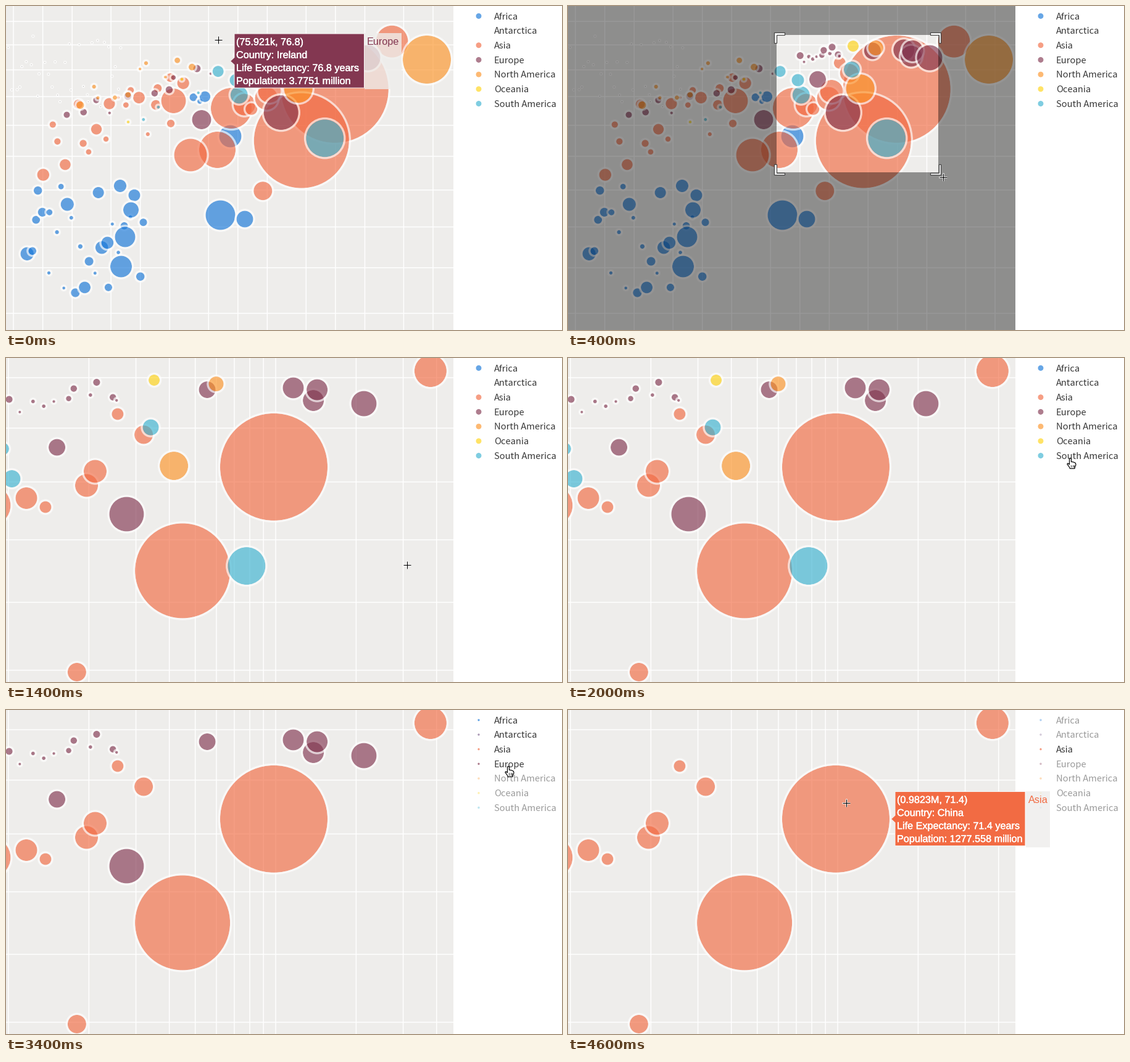
Write a matplotlib script that moves like this. It is 901x526 px and loops after 4800 ms.

```python
import numpy as np
import matplotlib.pyplot as plt
from matplotlib import patheffects
from matplotlib.animation import FuncAnimation
from matplotlib.collections import EllipseCollection
from matplotlib.patches import Polygon, Rectangle

W, H, DPI = 901, 526, 64
PT = 72 / DPI  # points per pixel
PLOT_W = 725
STEPS = 24
BG = "#eeedeb"
ALPHA = 0.65
RING = 3.3

# close-up view: screen = (wide - ORIGIN) * SCALE
ORIGIN = np.array([374.35, 47.25])
SCALE = np.array([2.739, 2.016])

COLORS = {
    "Africa": (22, 119, 218), "Antarctica": (125, 95, 140),
    "Asia": (242, 107, 67), "Europe": (131, 55, 81),
    "North America": (252, 148, 40), "Oceania": (255, 212, 20),
    "South America": (58, 179, 209),
}
NAMES = list(COLORS)

# the large countries: x, y, radius in the wide view
MAJOR = {
    "Africa": [(347.5, 339.5, 24), (363.5, 211.5, 18), (193, 375, 16.5),
               (186.5, 423, 17.5), (202.5, 331, 12.5), (387, 346, 13.5)],
    "Asia": [(532.8, 135, 87), (478.8, 218.6, 77), (365, 166, 33),
             (342.5, 233.5, 29.5), (299, 242, 26.5), (271.5, 154, 20),
             (386.4, 160.1, 17.5), (397.7, 167.3, 9.5), (422, 149.9, 18.5),
             (427.1, 138.5, 18.5), (440.4, 92.4, 9.5), (455.8, 109, 15),
             (416.3, 300.2, 15), (625.5, 57.7, 26)],
    "Europe": [(317, 184.5, 15.5), (404.5, 119.2, 13.5), (493.4, 72.8, 13.5),
               (544.3, 71.3, 17), (556.2, 81.5, 17), (558.4, 72.8, 17),
               (586.1, 84, 20.5), (445.7, 173, 28)],
    "North America": [(682, 87, 39), (498.7, 68.1, 12), (473.7, 134.1, 23)],
    "Oceania": [(462, 65.1, 9)],
    "South America": [(460, 103.1, 13), (516.7, 214.7, 30.5),
                      (377.8, 144.5, 14), (372.5, 120.4, 10)],
}

# the rest scatter about a trend line:
# group, count, x from, x to, y from, y to, scatter, largest radius
CLOUDS = [
    ("Africa", 29, 30, 225, 400, 375, 100, 11),
    ("Africa", 3, 300, 330, 155, 145, 6, 12),
    ("Asia", 20, 60, 290, 240, 130, 55, 10),
    ("Europe", 10, 90, 345, 175, 110, 20, 6.5),
    ("Europe", 11, 376, 446, 84, 72, 9, 6.5),
    ("North America", 10, 105, 305, 150, 95, 25, 6.5),
    ("Oceania", 2, 165, 340, 213, 80, 5, 4),
    ("South America", 4, 205, 360, 200, 105, 12, 10),
]


def scatter(rng, n, x0, x1, y0, y1, spread, r_max):
    t = (np.arange(n) + rng.random(n)) / n
    y = y0 + (y1 - y0) * t + spread * rng.uniform(-1, 1, n)
    r = 2 + (r_max - 2) * rng.random(n) ** 1.4
    return np.column_stack([x0 + (x1 - x0) * t, y, r])


def build():
    rng = np.random.default_rng(7)
    data = {name: np.array(rows, float) for name, rows in MAJOR.items()}
    for name, *cloud in CLOUDS:
        data[name] = np.vstack([scatter(rng, *cloud), data[name]])
    return data, scatter(rng, 34, 2, 195, 105, 105, 60, 2)[:, :2]


DATA, SPECKS = build()

# step after which each group starts to vanish, and how many steps it takes
HIDE = {"South America": (11, 1), "Oceania": (12, 1), "North America": (14, 2),
        "Europe": (17, 1), "Antarctica": (19, 1), "Africa": (21, 1)}

DRAG_END, ZOOM, LEGEND_HOVER, SHRINK = 6, 7, 10, 12
BOX_START, BOX_SIZE = np.array([338, 47]), np.array([302, 290])

HAND = [(-1.5, 1), (0, 0), (1.5, 1), (1.5, 6), (4, 6.2), (6.5, 7), (8.5, 8.2),
        (9, 11), (7.6, 14), (7, 17), (-.5, 17), (-2, 14), (-5, 10),
        (-4.5, 8.5), (-3, 9), (-1.5, 10.5)]
ARROW = [(0, 0), (0, 14), (3, 11), (5.5, 16.5), (7.6, 15.6), (5.2, 10.4),
         (9.8, 10)]
BRACKET = [(-4, 13), (-.5, 13), (-.5, -.5), (13, -.5), (13, -4), (-4, -4)]

fig = plt.figure(figsize=(W / DPI, H / DPI), dpi=DPI, facecolor="white")
ax = fig.add_axes([0, 0, 1, 1])


def rgb(name):
    return tuple(c / 255 for c in COLORS[name])


def rect(x, y, w, h, color, alpha=1, z=1):
    ax.add_patch(Rectangle((x, y), w, h, fc=color, ec="none",
                           alpha=alpha, zorder=z))


def shape(points, at, fill, edge, width=1, z=8):
    ax.add_patch(Polygon(np.array(points) + at, fc=fill, ec=edge,
                         lw=width * PT, zorder=z))


def label(x, y, text, color, size, font, alpha=1, z=6, weight=0):
    t = ax.text(x, y, text, color=color, fontsize=size * PT, family=font,
                alpha=alpha, va="baseline", zorder=z)
    if weight:
        t.set_path_effects([patheffects.withStroke(
            linewidth=weight * PT, foreground=color)])


def discs(xy, r, color, alpha, ring=RING, z=3):
    """Each disc is a fill followed by its own ring."""
    n = len(r)
    d = 2 * np.column_stack([r, r + ring / 2]).ravel()
    ax.add_collection(EllipseCollection(
        d, d, np.zeros(2 * n), units="xy", offsets=np.repeat(xy, 2, axis=0),
        offset_transform=ax.transData,
        facecolors=[(*color, alpha), (0, 0, 0, 0)] * n,
        edgecolors=[(0, 0, 0, 0), (1, 1, 1, alpha)] * n,
        linewidths=[0, ring * PT] * n, zorder=z))


def shown(name, i):
    start, steps = HIDE.get(name, (STEPS, 1))
    return float(np.clip(1 - (i - start) / steps, 0, 1))


def row_y(k):
    return 16.3 + 23.7 * k


def grid(zoomed):
    digits = range(1, 10) if zoomed else (1, 2, 5)
    gdp = np.array([d * 10.0 ** e for e in range(2, 8) for d in digits])
    age = np.arange(40, 90, 5)
    gx = 533.9 + 158.1 * np.log10(gdp / 1e6)
    gy = 63.1 + 628.8 * np.log(80 / age)
    if zoomed:
        gx = (gx - ORIGIN[0]) * SCALE[0]
        gy = (gy - ORIGIN[1]) * SCALE[1]
    gx = gx[(gx > 0) & (gx < PLOT_W)]
    style = dict(colors="white", lw=1.5 * PT, zorder=2, snap=False)
    ax.vlines(gx, 0, H, **style)
    ax.hlines(gy, 0, PLOT_W, **style)


def chart(i):
    zoomed = i >= ZOOM
    rect(0, 0, PLOT_W, H, BG)
    grid(zoomed)
    if not zoomed:
        discs(SPECKS, np.full(len(SPECKS), 0.7), (.55, .55, .55), ALPHA, 2)
    for name, d in DATA.items():
        xy = (d[:, :2] - ORIGIN) * SCALE if zoomed else d[:, :2]
        discs(xy, d[:, 2], rgb(name), ALPHA * shown(name, i))
    rect(PLOT_W, 0, W - PLOT_W, H, "white", z=4)


def legend(i):
    r = 1.8 if i >= SHRINK else 4.6
    for k, name in enumerate(NAMES):
        y, on = row_y(k), 0.5 + 0.5 * shown(name, i)
        if i >= SHRINK or name in DATA:
            discs(np.array([[766, y]]), np.array([r]), rgb(name),
                  ALPHA * on, z=5)
        label(791, y + 5.4, name, "#3a3a3a", 14.7, "Noto Sans CJK JP", on)


def box_corner(i):
    ease = 1 - (1 - i / DRAG_END) ** np.array([5, 3.6])
    return np.round(BOX_START + BOX_SIZE * ease)


def zoom_box(i):
    (x0, y0), (x1, y1) = BOX_START, box_corner(i)
    for box in ((0, 0, PLOT_W, y0), (0, y1, PLOT_W, H - y1),
                (0, y0, x0, y1 - y0), (x1, y0, PLOT_W - x1, y1 - y0)):
        rect(*box, "black", 0.4, 4)
    for x, sx in ((x0, 1), (x1, -1)):
        for y, sy in ((y0, 1), (y1, -1)):
            shape(np.array(BRACKET) * (sx, sy), (x, y), "white", "#444", 1.2)


def tooltip(x, y, w, name, name_w, lines):
    color, font = rgb(name), "Liberation Sans"
    rect(x + w + .5, y - 1, name_w, 91, BG, 0.8, 7)
    shape([(0, 0), (w, 0), (w, 88), (0, 88), (0, 50.5), (-6.5, 44.5),
           (0, 38.5)], (x, y), color, "#f6f3f2", z=7)
    for k, text in enumerate(lines):
        label(x + 3, y + 18.5 + 21.1 * k, text, "white", 16.2, font,
              z=8, weight=0.4)
    label(x + w + 4.5, y + 18.5, name, color, 16.2, font, z=8)


def cross(x, y):
    for color, width, arm in (("white", 2.6, 6.5), ("black", 1.1, 6)):
        for dx, dy in ((arm, 0), (0, arm)):
            ax.plot([x - dx, x + dx], [y - dy, y + dy], color=color,
                    lw=width * PT, solid_capstyle="butt", zorder=9)


def hand(x, y):
    shape(HAND, (x, y), "white", "black", 1.2, 9)
    for dx in (1.3, 3.6, 5.9):
        ax.plot([x + dx] * 2, [y + 11, y + 14.5], color="black",
                lw=0.8 * PT, zorder=9)


def cursor(i):
    if i == 0:
        cross(343.5, 54.5)
    elif i <= DRAG_END:
        lead = 0.5 + 10 * (1 - i / DRAG_END)
        cross(*(np.floor(box_corner(i) + lead) + 0.5))
    elif i == ZOOM:
        cross(649.5, 335.5)
    elif i < LEGEND_HOVER:
        shape(ARROW, (756 + 58 * (i - 8), 328), "black", "white", 1.2, 9)
    elif i < STEPS - 1:
        row = np.interp(i, [11, 13, 15, 16, 18, 19, 21, 22],
                        [6, 4, 4, 3, 3, 1, 1, 0])
        hand(814, row_y(row) + 4)
    else:
        cross(450.5, 150.5)


def draw(i):
    ax.cla()
    ax.set_axis_off()
    ax.set_autoscale_on(False)
    ax.set_xlim(0, W)
    ax.set_ylim(H, 0)

    chart(i)
    legend(i)
    if 0 < i <= DRAG_END:
        zoom_box(i)
    if i == 0:
        tooltip(370, 45, 210.5, "Europe", 60,
                ["(75.921k, 76.8)", "Country: Ireland",
                 "Life Expectancy: 76.8 years", "Population: 3.7751 million"])
    elif i == STEPS - 1:
        tooltip(530, 132.5, 211, "Asia", 39,
                ["(0.9823M, 71.4)", "Country: China",
                 "Life Expectancy: 71.4 years",
                 "Population: 1277.558 million"])
    cursor(i)
    return []


anim = FuncAnimation(fig, draw, frames=STEPS, interval=200, repeat=True,
                     repeat_delay=0)
plt.show()
```
